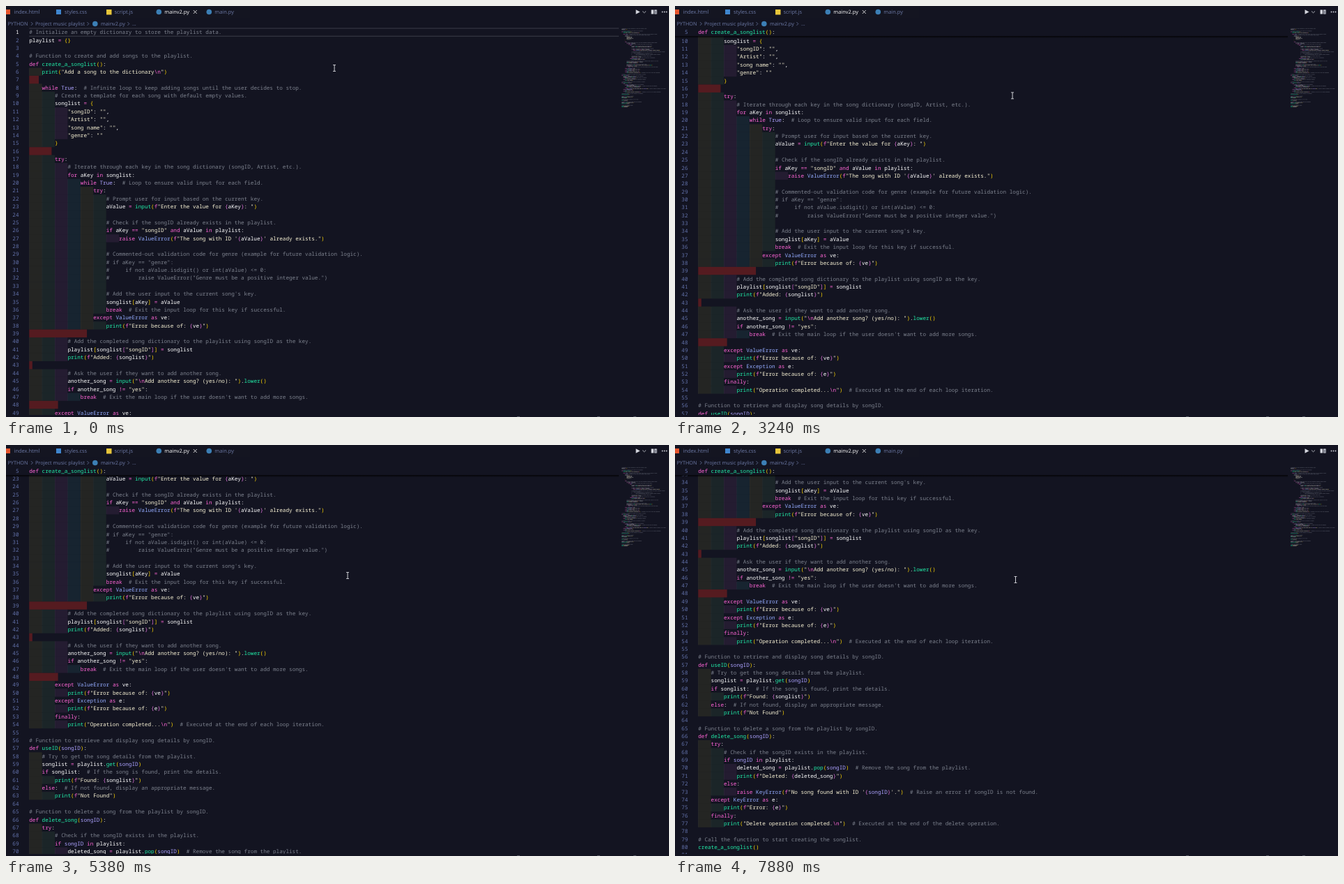
Write an HTML page with a canvas that moves like this. It is 951x589 px and loops after 8 s.

```html
<!DOCTYPE html>
<html lang="en">
<head>
<meta charset="utf-8">
<title>Code editor scroll</title>
<style>
html, body { margin: 0; width: 100%; height: 100%; overflow: hidden; background: #131421; }
canvas { display: block; width: 951px; height: 589px; }
</style>
</head>
<body>
<canvas id="stage"></canvas>
<script>
const W = 951, H = 589, LOOP = 8000;
const LINE = 11.363, CHAR = 4.603, LEFT = 33.2, TOP = 31.8, BOTTOM = 586, RIGHT = 879;
const WHEEL = 29.9;
const MONO = '500 7.67px "Noto Sans Mono", "DejaVu Sans Mono", monospace';
const SANS = '"Open Sans", "Noto Sans", sans-serif';
const COLOR = {
  bg: '#131421', tab: '#141521', comment: '#7d828e', keyword: '#ff66d6', fn: '#22eda9', type: '#94abff',
  param: '#aca2ff', string: '#faf4d6', text: '#ffffff', number: '#6271aa', dim: '#6c79a6'
};
const BRACKETS = ['#ffd700', '#da70d6', '#179fff'];
const INDENTS = ['rgba(255,255,64,.07)', 'rgba(127,255,127,.07)', 'rgba(255,127,255,.07)', 'rgba(79,236,236,.07)'];

const SOURCE = String.raw`# Initialize an empty dictionary to store the playlist data.
playlist = {}

# Function to create and add songs to the playlist.
def create_a_songlist():
    print("Add a song to the dictionary\n")

    while True:  # Infinite loop to keep adding songs until the user decides to stop.
        # Create a template for each song with default empty values.
        songlist = {
            "songID": "",
            "Artist": "",
            "song name": "",
            "genre": ""
        }

        try:
            # Iterate through each key in the song dictionary (songID, Artist, etc.).
            for aKey in songlist:
                while True:  # Loop to ensure valid input for each field.
                    try:
                        # Prompt user for input based on the current key.
                        aValue = input(f"Enter the value for {aKey}: ")

                        # Check if the songID already exists in the playlist.
                        if aKey == "songID" and aValue in playlist:
                            raise ValueError(f"The song with ID '{aValue}' already exists.")

                        # Commented-out validation code for genre (example for future validation logic).
                        # if aKey == "genre":
                        #     if not aValue.isdigit() or int(aValue) <= 0:
                        #         raise ValueError("Genre must be a positive integer value.")

                        # Add the user input to the current song's key.
                        songlist[aKey] = aValue
                        break  # Exit the input loop for this key if successful.
                    except ValueError as ve:
                        print(f"Error because of: {ve}")

            # Add the completed song dictionary to the playlist using songID as the key.
            playlist[songlist["songID"]] = songlist
            print(f"Added: {songlist}")

            # Ask the user if they want to add another song.
            another_song = input("\nAdd another song? (yes/no): ").lower()
            if another_song != "yes":
                break  # Exit the main loop if the user doesn't want to add more songs.

        except ValueError as ve:
            print(f"Error because of: {ve}")
        except Exception as e:
            print(f"Error because of: {e}")
        finally:
            print("Operation completed...\n")  # Executed at the end of each loop iteration.

# Function to retrieve and display song details by songID.
def useID(songID):
    # Try to get the song details from the playlist.
    songlist = playlist.get(songID)
    if songlist:  # If the song is found, print the details.
        print(f"Found: {songlist}")
    else:  # If not found, display an appropriate message.
        print(f"Not Found")

# Function to delete a song from the playlist by songID.
def delete_song(songID):
    try:
        # Check if the songID exists in the playlist.
        if songID in playlist:
            deleted_song = playlist.pop(songID)  # Remove the song from the playlist.
            print(f"Deleted: {deleted_song}")
        else:
            raise KeyError(f"No song found with ID '{songID}'.")  # Raise an error if songID is not found.
    except KeyError as e:
        print(f"Error: {e}")
    finally:
        print("Delete operation completed.\n")  # Executed at the end of the delete operation.

# Call the function to start creating the songlist.
create_a_songlist()

# Get song details by songID.
search = input("Song ID: ")
useID(search)

# Print the whole playlist as it is now.
print(playlist)

# Delete a song by its songID from the playlist.
target = input("Delete ID: ")
delete_song(target)

# Print the playlist again.
print("Playlist:")
print(playlist)`;

// Whitespace left on otherwise blank lines, by line number.
const BLANKS = { 7: 3, 16: 7, 24: 24, 28: 24, 33: 24, 39: 18, 43: 1, 48: 9 };
const KEYWORDS = new Set('def while try for in if and raise except as break else finally'.split(' '));

let depth = 0;

function wordColor(word, next) {
  if (KEYWORDS.has(word)) return COLOR.keyword;
  if (/Error$|^Exception$/.test(word)) return COLOR.type;
  if (word === 'True') return COLOR.param;
  if (next === '(') return COLOR.fn;
  return word === 'songID' ? COLOR.param : COLOR.text;
}

// Splits a line into coloured words, each with its column.
function tokenize(line) {
  const out = [];
  const add = (col, s, color) => {
    for (const word of s.matchAll(/\S+/g)) out.push({ col: col + word.index, s: word[0], color });
  };
  let pos = 0, inString = false, hole = false, format = false;
  while (pos < line.length) {
    const re = inString && !hole ? /\\n|[{}"]|[^"\\{}]+/y : /#.*|f?"|\w+|\s+|[^\w\s]/y;
    re.lastIndex = pos;
    const s = re.exec(line)[0];
    let color = COLOR.text;
    if (inString && !hole && s !== '"' && !(format && s === '{')) {
      color = s === '\\n' ? COLOR.keyword : COLOR.string;
    } else if (s[0] === '#') {
      color = COLOR.comment;
    } else if (s.endsWith('"')) {
      color = COLOR.string;
      format = s[0] === 'f';
      if (format) add(pos, 'f', COLOR.keyword);
      inString = !inString;
    } else if ('([{'.includes(s)) {
      color = BRACKETS[depth++ % 3];
      hole = inString;
    } else if (')]}'.includes(s)) {
      color = BRACKETS[--depth % 3];
      hole = false;
    } else if (/\w/.test(s)) {
      color = wordColor(s, line[pos + s.length]);
    } else if (/[=!]/.test(s)) {
      color = COLOR.keyword;
    }
    const skip = s === 'f"' ? 1 : 0;
    add(pos + skip, s.slice(skip), color);
    pos += s.length;
  }
  return out;
}

const lines = SOURCE.split('\n').map((text, i) => ({
  indent: text ? text.search(/\S/) : BLANKS[i + 1] || 0,
  tokens: tokenize(text)
}));

const SCROLLS = [1030, 2530, 3000, 3610, 3860, 4660, 5050, 5380, 5780, 6020, 6830, 7880];

// Pointer moves: start, end, steps, from x, y, to x, y.
const MOVES = [
  [1460, 1460, 1, 471, 89, 472, 89],
  [1740, 1910, 6, 472, 89, 476, 89],
  [2620, 3240, 19, 476, 89, 484, 128.5],
  [3820, 3960, 6, 484, 128.5, 486, 133],
  [4270, 4440, 7, 486, 133, 487.5, 149],
  [4810, 5380, 20, 487.5, 149, 490, 187],
  [5780, 6020, 7, 490, 187, 488.5, 191],
  [7200, 7240, 2, 488.5, 191, 488.5, 193]
];

function pointerAt(t) {
  let pos = [471, 89];
  for (const [a, b, n, x0, y0, x1, y1] of MOVES) {
    if (t < a) break;
    const part = b > a ? Math.min(1, (t - a) / (b - a)) : 1;
    const k = (Math.floor(part * (n - 1) + 1e-6) + 1) / n;
    pos = [x0 + (x1 - x0) * k, y0 + (y1 - y0) * k];
  }
  return pos;
}

const canvas = document.getElementById('stage');
const ratio = window.devicePixelRatio || 1;
canvas.width = Math.round(W * ratio);
canvas.height = Math.round(H * ratio);
const ctx = canvas.getContext('2d');
ctx.scale(ratio, ratio);
ctx.textRendering = 'geometricPrecision';

function rect(x, y, w, h, color) {
  ctx.fillStyle = color;
  ctx.fillRect(x, y, w, h);
}

function dot(x, y, r, color) {
  ctx.fillStyle = color;
  ctx.beginPath();
  ctx.arc(x, y, r, 0, Math.PI * 2);
  ctx.fill();
}

function path(points, color, width = 0.8) {
  ctx.strokeStyle = color;
  ctx.lineWidth = width;
  ctx.beginPath();
  points.forEach(([x, y], i) => i ? ctx.lineTo(x, y) : ctx.moveTo(x, y));
  ctx.stroke();
}

function label(s, x, y, color, size) {
  ctx.font = size + 'px ' + SANS;
  ctx.textAlign = 'left';
  ctx.fillStyle = color;
  ctx.fillText(s, x, y);
}

function drawLine(i, top) {
  const { indent, tokens } = lines[i];
  if (indent % 4) {
    rect(LEFT, top, indent * CHAR, LINE, 'rgba(128,32,32,.6)');
  } else {
    for (let k = 0; k < indent / 4; k++) {
      const x = LEFT + k * 4 * CHAR;
      rect(x, top, 4 * CHAR, LINE, INDENTS[k % 4]);
      rect(x, top, 0.6, LINE, 'rgba(255,255,255,.06)');
    }
  }
  const base = top + LINE / 2 + 2.7;
  ctx.font = MONO;
  ctx.textAlign = 'right';
  ctx.fillStyle = i ? COLOR.number : COLOR.text;
  ctx.fillText(i + 1, 18.5, base);
  ctx.textAlign = 'left';
  for (const { col, s, color } of tokens) {
    ctx.fillStyle = color;
    ctx.fillText(s, LEFT + col * CHAR, base);
  }
}

function shadow(y, x, alpha) {
  const g = ctx.createLinearGradient(0, y, 0, y + 3);
  g.addColorStop(0, `rgba(0,0,0,${alpha})`);
  g.addColorStop(1, 'rgba(0,0,0,0)');
  rect(x, y, RIGHT - x, 3, g);
}

function drawCode(ticks) {
  ctx.save();
  ctx.beginPath();
  ctx.rect(0, TOP - 0.8, RIGHT, BOTTOM - TOP + 0.8);
  ctx.clip();
  const scroll = ticks * WHEEL;
  lines.forEach((_, i) => {
    const top = TOP + i * LINE - scroll;
    if (top > TOP - LINE && top < BOTTOM) drawLine(i, top);
  });
  if (!ticks) {
    rect(LEFT, 31.6, RIGHT - LEFT, 0.8, '#464853');
    rect(LEFT, 42.8, RIGHT - LEFT, 0.8, '#464853');
  } else if (ticks === 1) {
    shadow(31, 8, 0.5);
  } else {
    rect(0, TOP - 1, RIGHT, LINE + 1, COLOR.bg);
    drawLine(4, TOP);
    shadow(TOP + LINE, 0, 0.85);
  }
  ctx.restore();
}

function drawMinimap() {
  ctx.globalAlpha = 0.45;
  lines.forEach(({ tokens }, i) => {
    for (const { col, s, color } of tokens) {
      rect(883 + col * 0.598, 31.9 + i * 1.196, s.length * 0.598, 0.75, color);
    }
  });
  ctx.globalAlpha = 1;
}

function drawTabs() {
  const size = 7.45, base = 11.2;
  rect(0, 0, 350, 17, COLOR.tab);
  rect(0, 5, 6, 7, '#e4552d');
  label('index.html', 11.5, base, COLOR.dim, size);
  rect(72, 5, 7, 7, '#3f86cf');
  label('styles.css', 84, base, COLOR.dim, size);
  rect(144, 5, 7.5, 7.5, '#e8c63a');
  label('script.js', 155.5, base, COLOR.dim, size);
  dot(219.3, 8.5, 3.8, '#3c7fb5');
  label('mainv2.py', 227.3, base, COLOR.text, size);
  path([[268.8, 6], [273.8, 11]], COLOR.text);
  path([[273.8, 6], [268.8, 11]], COLOR.text);
  dot(291.3, 8.5, 3.8, '#3c7fb5');
  label('main.py', 299.3, base, COLOR.dim, size);
}

function drawActions() {
  const color = '#d4d6de';
  ctx.fillStyle = color;
  ctx.beginPath();
  ctx.moveTo(903.5, 5.3);
  ctx.lineTo(909.5, 8.5);
  ctx.lineTo(903.5, 11.7);
  ctx.fill();
  path([[913, 7.5], [915.5, 9.8], [918, 7.5]], color);
  rect(925.5, 5.5, 3.6, 6, color);
  rect(930, 5.5, 3.6, 6, color);
  rect(930.7, 6.7, 2.2, 4.1, '#777a88');
  for (const x of [941.5, 944.5, 947.5]) dot(x, 8.5, 0.9, color);
}

function drawBreadcrumb() {
  const size = 7.27, base = 28.2;
  label('PYTHON', 2.5, base, COLOR.dim, size);
  label('Project music playlist', 42, base, COLOR.dim, size);
  dot(127.8, 25.5, 3.8, '#3c7fb5');
  label('mainv2.py', 136, base, COLOR.dim, size);
  label('...', 181, base, COLOR.dim, size);
  for (const x of [36, 116.5, 174.5]) path([[x, 23.2], [x + 2.3, 25.5], [x, 27.8]], COLOR.dim);
}

function drawPointer([x, y]) {
  const color = '#e6e7ec';
  rect(x - 0.4, y - 4.5, 0.9, 9, color);
  rect(x - 2, y - 5, 4, 0.8, color);
  rect(x - 2, y + 4, 4, 0.8, color);
}

function draw(t) {
  rect(0, 0, W, H, COLOR.bg);
  drawTabs();
  drawActions();
  drawBreadcrumb();
  drawCode(SCROLLS.filter(s => t >= s).length);
  drawMinimap();
  for (const x of [733, 848, 900]) rect(x, 588, 4, 1, '#50535f');
  drawPointer(pointerAt(t));
}

const start = performance.now();
function frame() {
  draw((performance.now() - start) % LOOP);
  requestAnimationFrame(frame);
}
frame();
</script>
</body>
</html>
```
